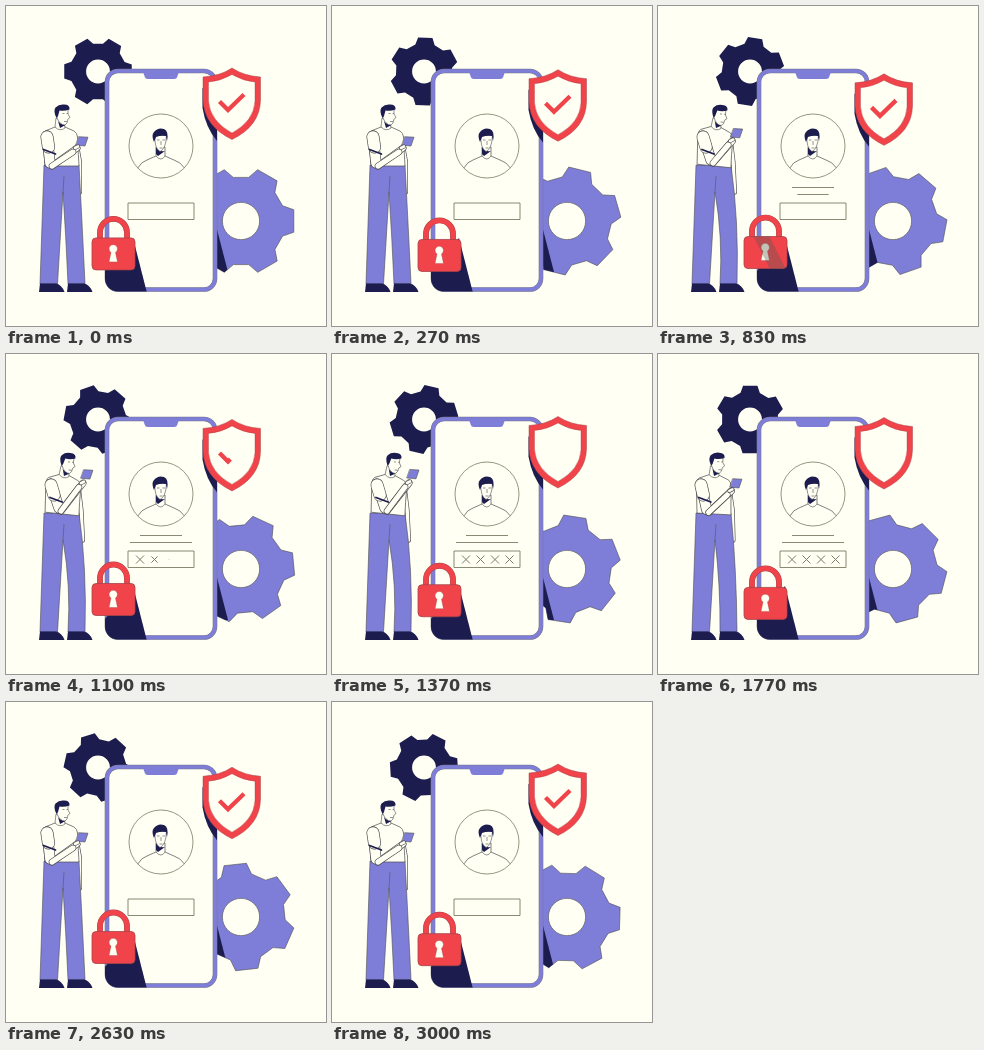
These frames come from a looping animation (320x320 px, 3.03 s). An HTML page with a canvas:

```html
<!DOCTYPE html>
<html lang="en">
<head>
<meta charset="utf-8">
<title>Secure sign-in</title>
<style>
html, body { margin: 0; width: 100%; height: 100%; overflow: hidden; background: #fffff3; }
canvas { display: block; width: 320px; height: 320px; }
</style>
</head>
<body>
<canvas id="stage"></canvas>
<script>
const LOOP = 3030, TAU = Math.PI * 2;
const PAPER = '#fffff3', NAVY = '#1c1c4e', VIOLET = '#7e7ed8', RED = '#f0434a',
  LINE = '#4c4c50', SOFT = '#7c7c66', EDGE = '#a8444a', GLINT = 'rgba(90,90,85,.36)';

const canvas = document.getElementById('stage');
const c = canvas.getContext('2d');
const dpr = window.devicePixelRatio || 1;
canvas.width = canvas.height = 320 * dpr;

const clamp = v => Math.min(1, Math.max(0, v));
const ease = (t, from, to) => {
  const u = clamp((t - from) / (to - from));
  return u * u * (3 - 2 * u);
};
// Rises during [a, b], holds, falls during [d, e]
const hold = (t, a, b, d, e) => ease(t, a, b) - ease(t, d, e);
const mix = (a, b, u) => a + (b - a) * u;

function paint(path, fill, stroke, width = 0.7) {
  const p = typeof path === 'string' ? new Path2D(path) : path;
  if (fill) { c.fillStyle = fill; c.fill(p, 'evenodd'); }
  if (stroke) { c.strokeStyle = stroke; c.lineWidth = width; c.stroke(p); }
}

function layer(draw, clip) {
  c.save();
  if (clip) c.clip(typeof clip === 'string' ? new Path2D(clip) : clip, 'evenodd');
  draw();
  c.restore();
}

function box(x, y, w, h, r) {
  const p = new Path2D();
  p.roundRect(x, y, w, h, r);
  return p;
}

function disc(x, y, r) {
  const p = new Path2D();
  p.arc(x, y, r, 0, TAU);
  return p;
}

function gear(x, y, r, turn) {
  const p = new Path2D();
  for (let i = 0; i < 6; i++) {
    for (const [deg, k] of [[-20, 0.82], [-12, 1], [12, 1], [20, 0.82]]) {
      const a = turn + (i * 60 + deg) * TAU / 360;
      p.lineTo(x + Math.cos(a) * r * k, y + Math.sin(a) * r * k);
    }
  }
  p.closePath();
  p.addPath(disc(x, y, r * 0.345));
  return p;
}

function gears(p) {
  paint(gear(92, 65.5, 34.5, p * TAU), NAVY);
  const big = gear(235, 215, 54, -p * TAU / 2);
  paint(big, VIOLET, LINE, 0.6);
  layer(() => paint('M208 212L222 266H208Z', NAVY), big);
}

function avatar() {
  const ring = disc(155, 140, 32);
  layer(() => {
    paint('M130 176Q129 158 141 154L150 150V141H159V150L168 154Q181 158 182 176', PAPER, LINE);
    paint('M150 150Q155 156 159 150', null, LINE, 0.6);
    paint('M150 141Q153 146 159 145L152 150L150 148Z', NAVY);
    paint('M149 129Q148 142 154 145.500Q160 143 160.500 129Z', PAPER, LINE, 0.6);
    paint('M148 136Q145 129 148 126Q152 121 158 123Q163 125 161 135L160 130Q155 129 150 131Z', NAVY);
    paint('M151 134H153.500M156.500 134H159M155 135V139M153.500 142H156.500', null, LINE, 0.6);
  }, ring);
  paint(ring, null, SOFT, 0.8);
}

function phone(t, bob) {
  const body = box(101, 65, 108, 218.5, 11);
  paint(body, PAPER);
  paint(body, null, '#77778c', 4.6);
  paint(body, null, VIOLET, 3.6);
  paint('M136 66H174Q172 67 171.500 70Q171 73 168 73H142Q139 73 138.500 70Q138 67 136 66Z', VIOLET);
  layer(() => {
    paint('M98 266L127 232L141 287H98Z', NAVY);
    c.translate(0, bob);
    paint('M196.500 82H212V136Q200 123 196.500 102Z', NAVY);
  }, box(99, 63, 112, 222.5, 13));
  avatar();
  paint(box(122, 197, 66, 16.5, 0), null, SOFT, 0.9);

  const rules = [
    [181.5, 21, hold(t, 550, 820, 2130, 2400)],
    [188.5, 31, hold(t, 690, 970, 2050, 2320)]
  ];
  for (const [y, half, u] of rules)
    if (u > 0) paint(`M${155 - half * u} ${y}H${155 + half * u}`, null, SOFT, 0.9);

  for (let i = 0; i < 4; i++) {
    const s = 4 * hold(t, 930 + i * 80, 1060 + i * 80, 2180 + i * 50, 2300 + i * 50);
    const x = 134 + i * 14.5, y = 205.5;
    if (s > 0)
      paint(`M${x - s} ${y - s}L${x + s} ${y + s}M${x + s} ${y - s}L${x - s} ${y + s}`, null, SOFT, 1);
  }
}

function glint(x, y, w, h) {
  paint(`M${x - w - h / 4} ${y - h / 2}H${x + w - h / 4}L${x + w + h / 4} ${y + h / 2}H${x - w + h / 4}Z`, GLINT);
}

function shield(t, bob) {
  const outer = 'M226 62Q214 70 197 71V94Q198 120 226 133.500Q254 120 254.500 94V71Q238 70 226 62Z';
  const inner = 'M226 68.500Q215 75 202.500 76V95Q204 115 226 127Q248 115 249 95V76Q237 75 226 68.500Z';
  layer(() => {
    c.translate(0, bob);
    paint(outer, RED, EDGE, 0.5);
    paint(inner, PAPER, EDGE, 0.4);
    const mark = hold(t, -2, -1, 980, 1200) + ease(t, 2220, 2520);
    if (mark > 0) layer(() => {
      c.setLineDash([36 * mark, 99]);
      paint('M213.500 95.500L222 104L238 88.500', null, RED, 4.3);
    });
    if (t > 330 && t < 730)
      layer(() => glint(mix(186, 266, (t - 330) / 400), 98, 9, 60), inner);
  });
}

function lock(t, p) {
  const body = box(86, 231.5, 43, 32, 4);
  layer(() => {
    c.translate(0, 2 * Math.sin(p * TAU * 2 + 0.2));
    const bow = 'M94 233V226A13.500 13.500 0 0 1 121 226V233';
    paint(bow, null, EDGE, 5.8);
    paint(bow, null, RED, 4.9);
    paint(body, RED, EDGE, 0.8);
    paint('M105 246A4.200 4.200 0 1 1 109.500 246L111.500 255.500H103Z', PAPER, EDGE, 0.4);
    if (t > 660 && t < 980)
      layer(() => glint(mix(79, 140, (t - 660) / 320), 247.5, 8, 34), body);
  });
}

function limb(points, width) {
  const d = 'M' + points.map(q => q.join(' ')).join('L');
  c.lineJoin = c.lineCap = 'round';
  paint(d, null, LINE, width);
  paint(d, null, PAPER, width - 1.3);
}

function man(t) {
  const lean = hold(t, 300, 850, 1500, 2050);
  const lift = hold(t, 480, 1150, 1400, 2050);

  // Hanging arm, then legs and shoes
  layer(() => limb([[mix(69, 72, lean), 131], [mix(73.5, 75, lean), 156], [mix(73.5, 76.5, lean), 186]], 5));
  const knee = 5 * lean;
  paint(`M38 159H73Q${76 + knee} 215 79 278H62Q${60 + knee} 232 57 186L51.500 278H34Z`, VIOLET, LINE, 0.6);
  paint('M57 186L58 170', null, LINE, 0.5);
  for (const x of [34, 62])
    paint(`M${x} 277.500H${x + 16}Q${x + 22} 279 ${x + 24.5} 286H${x - 1}Z`, NAVY);

  layer(() => {
    c.translate(56, 160);
    c.rotate(lean * 0.105);
    c.translate(-56, -160);
    paint('M49 121L39 125Q36 127 37 135L39 160H73Q72 147 72 133Q71 126 68 125L59 121Z', PAPER, LINE);
    paint('M50 112L49 121Q54 126 59 122L58 116Z', PAPER, LINE, 0.6);
    paint('M52 115Q55 119 59.500 119L54 122Z', NAVY);
    paint('M51 105V112Q54 119 59 119Q61.500 118 62 113L64 111.500L62 108V103H51Z', PAPER, LINE, 0.6);
    paint('M50.500 112Q47 105 49.500 101.500Q53 98 58 98.500Q64 98.500 63.500 103.500Q58 105.500 53.500 104.500L52 110Z', NAVY);
    paint('M56.500 107.500H58.500M60.500 107.500H62M58 115.500H61', null, LINE, 0.6);
  });

  // Near arm holding the handset
  layer(() => {
    const sx = mix(41, 45, lean), ex = mix(46, 55, lean), ey = mix(160, 157, lean);
    const hx = mix(71, 77, lift), hy = mix(142, 129, lift);
    limb([[ex, ey], [hx, hy]], 7);
    limb([[sx, 130], [ex - 2, ey - 3]], 11);
    limb([[sx, 131], [mix(sx, ex, 0.3), 141]], 13);
    limb([[ex, ey], [hx - 4, hy + 4]], 6.5);
    const cx = mix(sx, ex, 0.5);
    paint(`M${cx - 6} 143.500L${cx + 6} 148`, null, NAVY, 1.8);
    layer(() => {
      c.translate(mix(76, 81, lift), mix(135.2, 120, lift));
      paint('M-3 -4.500L6 -4L3 4.800L-6 4Z', VIOLET, LINE, 0.6);
    });
    limb([[hx - 2, hy], [hx + 1, hy - 1.5]], 4);
  });
}

function frame(now) {
  const t = now % LOOP, p = t / LOOP;
  const bob = 3 - 3 * Math.cos(p * TAU * 2);
  c.setTransform(dpr, 0, 0, dpr, 0, 0);
  c.fillStyle = PAPER;
  c.fillRect(0, 0, 320, 320);
  gears(p);
  phone(t, bob);
  shield(t, bob);
  lock(t, p);
  man(t);
}

const start = performance.now();
(function tick() {
  frame(performance.now() - start);
  requestAnimationFrame(tick);
})();
</script>
</body>
</html>
```
